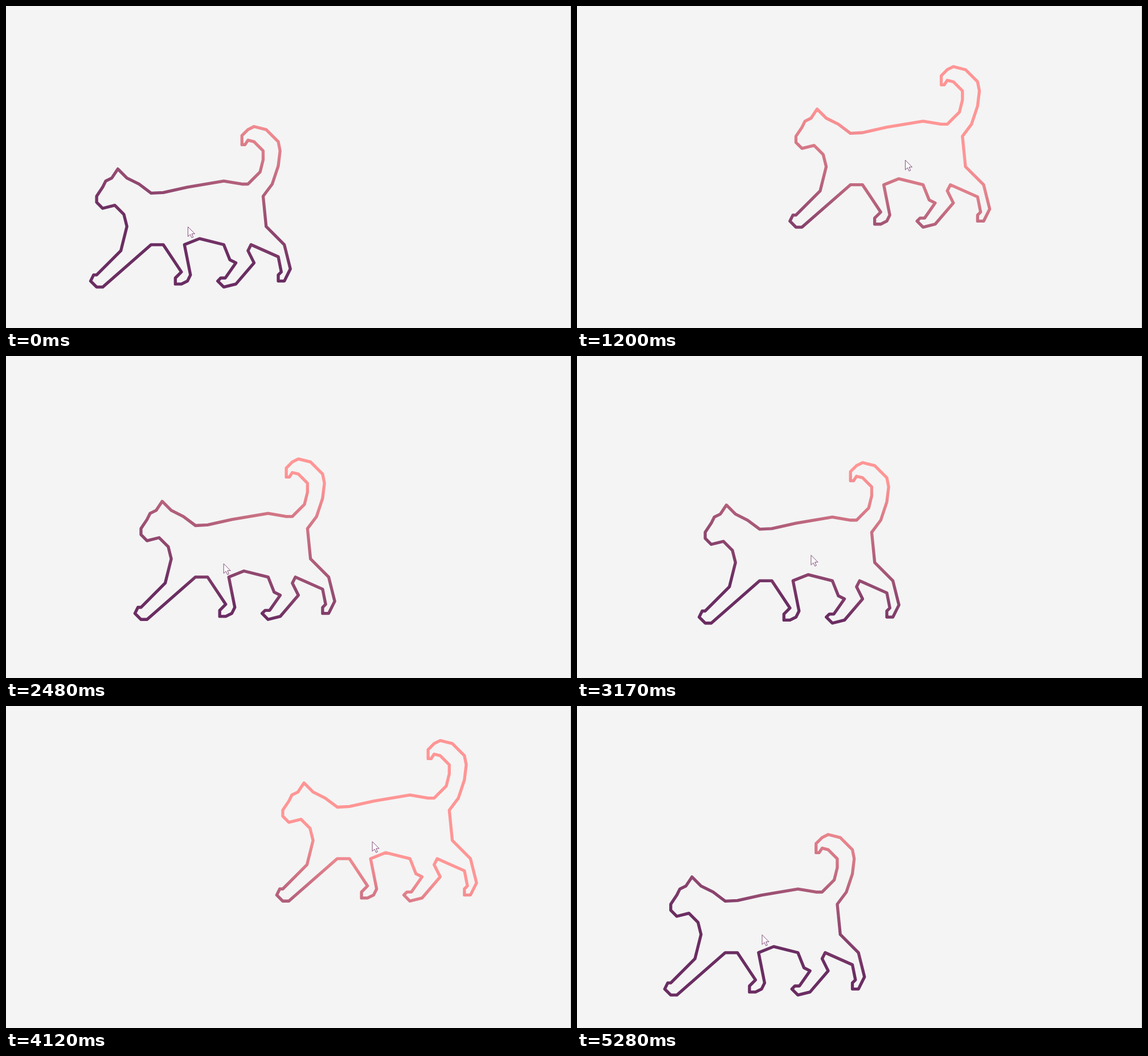
Recreate the animation shown at these times as an HTML page. Size 992x565 px, loop 5340 ms.

```html
<!DOCTYPE html>
<html lang="en">
<head>
<meta charset="utf-8">
<title>Cat following the pointer</title>
<style>
html, body { margin: 0; width: 100%; height: 100%; overflow: hidden; background: #f4f4f4; }
svg { display: block; width: 100%; height: 100%; }
</style>
</head>
<body>
<svg viewBox="0 0 992 565">
  <defs>
    <linearGradient id="ink" gradientUnits="userSpaceOnUse" x1="0" y1="300" x2="84" y2="59.5">
      <stop offset="0" stop-color="#6a2d62"/>
      <stop offset="1" stop-color="#ff9595"/>
    </linearGradient>
  </defs>
  <rect width="992" height="565" fill="#f4f4f4"/>
  <rect x="991" width="1" height="565" fill="#cacaca"/>
  <!-- Outline on a whole-number grid -->
  <path id="cat" fill="none" stroke="url(#ink)" stroke-linejoin="round" d="
    M9 14 12 17 16 19 20 22 24 21.8 32 20 44 18 50 19H52
    L56 15 57 11V8L54 5 52 4.5 51 6H50V3L52 1 54 0 58 1 62 5 62.6 8 62 13 60 19 57 23
    58 33 64 39 66 47 64 51H62V49L63 48 62 43 53 39 52 41 54 45 48 52 44 53 42 51 43 50H44.5
    L48 45 46 44 44 39 36 37 31 39 33 49 32 51 30 52H28V50L30 48 24 39H20
    L4 53H2L0 51 1 49H2L10 41 12 33 11 29 8 26 4 27 2 25V23L4 20 5 18 7 17Z"/>
  <path id="pointer" fill="#fff" stroke="#74376a" stroke-width="0.9"
    d="M0 0V17L4 13.3 6.7 19.2 9.2 18.1 6.7 12.2H12Z"/>
</svg>
<script>
const LOOP = 5340;
const GRID = 5.315;   // pixels per outline unit
const LAG = 112;      // the cat trails the pointer by this many ms

// Where the cat passes: time, x, y from its first place
const keys = [
  [600, 0, 0], [1200, 225, -105], [1590, 313, -135],
  [1720, 313, -135], [1870, 286, -125], [2480, 78, -31], [2810, 50, -16],
  [3040, 50, -16], [3650, 233, -110], [4060, 327, -151],
  [4110, 327, -151], [4520, 203, -98], [4730, 108, -42], [5280, 5.5, 14]
];

const cat = document.getElementById("cat");
const pointer = document.getElementById("pointer");
const ink = document.getElementById("ink");

function slope(i, axis) {
  const a = keys[i], b = keys[i + 1];
  return a && b ? (b[axis] - a[axis]) / (b[0] - a[0]) : 0;
}

function tangent(i, axis) {
  const p = slope(i - 1, axis), q = slope(i, axis);
  return p * q > 0 ? 2 * p * q / (p + q) : 0;
}

// Monotone cubic curve: position and velocity on one axis
function move(t, axis) {
  const last = keys.length - 1;
  t = Math.max(keys[0][0], Math.min(keys[last][0], t));
  const i = Math.max(0, keys.findIndex(k => k[0] >= t) - 1);
  const a = keys[i], b = keys[i + 1];
  const h = b[0] - a[0], u = (t - a[0]) / h, v = 1 - u;
  const m = tangent(i, axis), n = tangent(i + 1, axis);
  return {
    pos: v * v * (1 + 2 * u) * a[axis] + u * u * (3 - 2 * u) * b[axis] + h * u * v * (v * m - u * n),
    vel: 6 * u * v * slope(i, axis) + v * (v - 2 * u) * m + u * (u - 2 * v) * n
  };
}

function draw(time) {
  const t = time % LOOP, x = move(t, 1), y = move(t, 2);
  const left = 148.5 + x.pos, top = 211.5 + y.pos;
  cat.setAttribute("transform", `translate(${left} ${top}) scale(${GRID})`);
  // The colours stay fixed to the stage
  ink.setAttribute("gradientTransform", `scale(${1 / GRID}) translate(${-left} ${-top})`);
  const px = 319.5 + x.pos + LAG * x.vel, py = 387.5 + y.pos + LAG * y.vel;
  pointer.setAttribute("transform", `translate(${px} ${py})`);
}

const begin = performance.now();
function tick() {
  draw(performance.now() - begin);
  requestAnimationFrame(tick);
}
tick();
</script>
</body>
</html>
```
